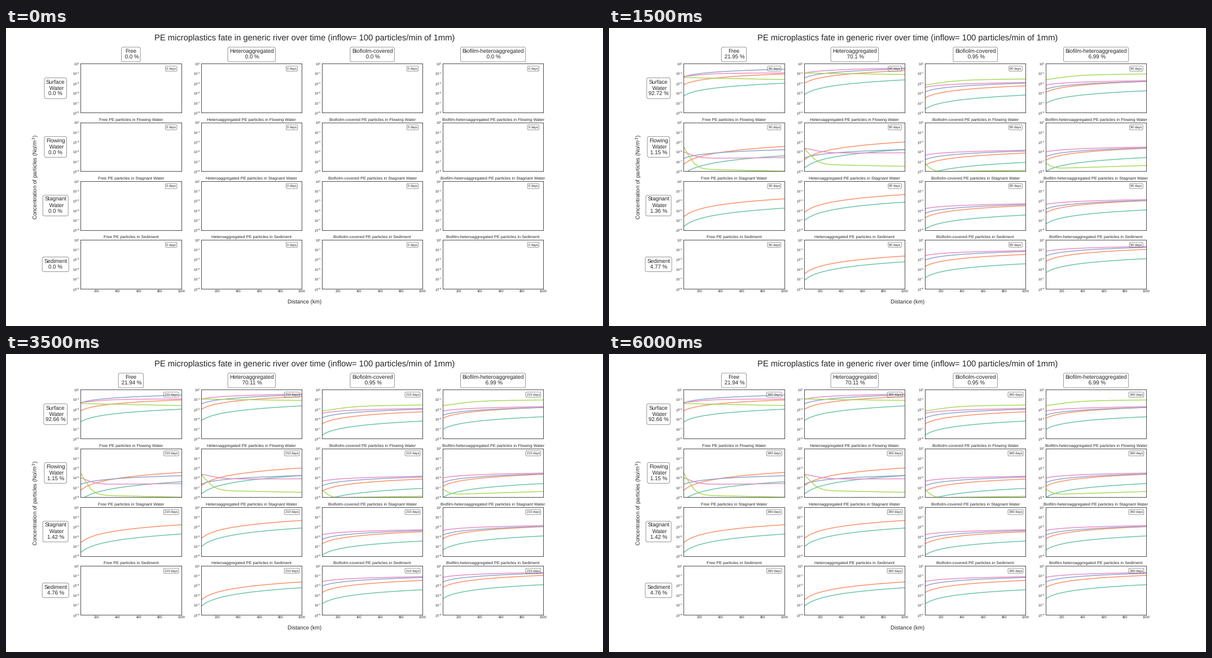
A matplotlib script for the animation above (6500 ms loop, 1058 by 529 pixels).

```python
import numpy as np
import matplotlib.pyplot as plt
from matplotlib.animation import FuncAnimation

INK = "0.15"
plt.rcParams.update({
    "font.family": "sans-serif",
    "font.sans-serif": ["Liberation Sans"],
    "mathtext.fontset": "dejavusans",
    "text.hinting": "none",
    "text.color": INK,
    "axes.edgecolor": INK,
    "axes.linewidth": 1.0,
    "xtick.color": INK,
})

TEAL, ORANGE, BLUE, PINK, GREEN = "#66c2a5", "#fc8d62", "#8da0cb", "#e78ac3", "#a6d854"
FORMS = ("Free", "Heteroaggregated", "Biofiolm-covered", "Biofilm-heteroaggregated")
PLACES = ("Surface Water", "Flowing Water", "Stagnant Water", "Sediment")

STEP_DAYS = 30
FRAMES = 13
SETTLE_DAYS = 28.2

# Share in percent: settled value and the part that decays away
FORM_SHARES = ((21.937, 0.21), (70.112, -0.29), (0.95, 0.02), (6.99, 0.11))
PLACE_SHARES = ((92.6635, 1.354), (1.153, 0.02), (1.42, -1.42), (4.7635, 0.05))

# log10 concentration at the river's end, places down and forms across
NONE = np.nan
TEAL_ENDS = np.array([[-2.98, -2.29, -5.40, -4.52],
                      [-5.80, -4.55, -7.16, -6.18],
                      [-4.50, -3.27, -5.93, -4.89],
                      [NONE, -3.47, -3.89, -2.85]])
BLUE_ENDS = np.array([[-0.10, -0.04, -2.98, -2.62],
                      [-4.57, -4.53, -4.85, -4.20],
                      [NONE, NONE, -3.80, -2.94],
                      [NONE, NONE, -1.38, -0.53]])
ORANGE_GAP = np.full((4, 4), 1.9)
ORANGE_GAP[1:, 1] = 1.56, 1.55, 1.18
PINK_GAP = 0.17
SURFACE_SPREAD = (0.9, 1.05, 1.0, 0.9)

# Curves that bend early: start, level after the bend, end, bend length in km
BENDS = {
    (0, 0): {PINK: (-1.59, -1.00, -0.87, 200), GREEN: (-1.82, -1.82, -2.23, 80)},
    (0, 1): {GREEN: (-0.90, -0.90, -1.19, 80)},
    (0, 2): {GREEN: (-3.32, -2.40, -2.11, 220)},
    (0, 3): {GREEN: (-2.23, -1.35, -1.08, 220)},
    (1, 0): {PINK: (-5.00, -6.38, -6.18, 105), GREEN: (-4.00, -8.50, -8.96, 80)},
    (1, 1): {PINK: (-4.28, -5.30, -5.20, 150), GREEN: (-4.34, -7.55, -7.97, 90)},
    (1, 2): {GREEN: (-7.40, -9.10, -8.77, 55)},
    (1, 3): {GREEN: (-7.30, -8.45, -7.80, 55)},
}

cell = np.arange(1, 21)
distance = 50 * cell
reach = np.log((cell + 0.5) / 1.5) / np.log(20.5 / 1.5)


def grow(end, rise):
    return end - rise * (1 - reach)


def bend(start, level, end, length):
    travelled = distance - distance[0]
    decay = np.exp(-(travelled / length) ** 1.4)
    return level + (start - level) * decay + (end - level) * travelled / travelled[-1]


def fills_slowly(panel):
    row, col = panel
    return row > 1 and col < 2


def panel_levels(panel):
    row, col = panel
    spread = SURFACE_SPREAD[col] if row == 0 else 1
    fine_rises = (3.75, 3.63) if row and col < 2 else (2.85 * spread, 2.45 * spread)
    teal, blue = TEAL_ENDS[panel], BLUE_ENDS[panel]
    levels = {
        TEAL: grow(teal, fine_rises[0]),
        ORANGE: grow(teal + ORANGE_GAP[panel], fine_rises[1]),
        BLUE: grow(blue, 1.75 * spread),
        PINK: grow(blue + PINK_GAP, 1.0 * spread),
    }
    levels.update({color: bend(*shape) for color, shape in BENDS.get(panel, {}).items()})
    return levels


def boxed(ax, x, y, size):
    box = dict(boxstyle="round", facecolor="white", edgecolor="black", alpha=0.5)
    return ax.text(x, y, "", transform=ax.transAxes, fontsize=size,
                   ha="center", va="center", bbox=box)


def style_axes(ax, row, col):
    ax.set(xlim=(50, 1000), ylim=(-9, 1), yticks=[])
    ax.set_xticks(range(200, 1001, 200))
    ax.tick_params(length=0, pad=2.5, labelsize=7, labelbottom=row == 3)
    for power in range(-9, 2, 2):
        ax.annotate(rf"$\mathdefault{{10^{{{power}}}}}$", (0, power),
                    xycoords=("axes fraction", "data"), xytext=(-1.7, -4.4),
                    textcoords="offset points", fontsize=7,
                    ha="right", va="baseline")
    if row:
        ax.set_title(f"{FORMS[col]} PE particles in {PLACES[row]}", fontsize=9, pad=4)


def share(parts, day):
    settled, amplitude = parts
    value = settled + amplitude * np.exp(-day / SETTLE_DAYS) if day else 0.0
    return f"{round(float(value), 2)} %"


fig, axes = plt.subplots(4, 4, figsize=(18, 9), dpi=1058 / 18)
fig.subplots_adjust(left=0.125, right=0.9, bottom=0.125, top=0.88,
                    wspace=0.2, hspace=0.2)
fig.suptitle("PE microplastics fate in generic river over time "
             "(inflow= 100 particles/min of 1mm)", fontsize=18)
fig.text(0.5, 0.075, "Distance (km)", fontsize=12, ha="center")
fig.text(0.05, 0.5, "Concentration of particles (No/$m^3$)", fontsize=12,
         rotation=90, ha="center", va="center")

curves, day_labels = [], []
for panel, ax in np.ndenumerate(axes):
    style_axes(ax, *panel)
    for color, levels in panel_levels(panel).items():
        line, = ax.plot([], [], color=color, lw=1.75)
        curves.append((line, levels, fills_slowly(panel)))
    day_labels.append(boxed(ax, 0.9, 0.9, 7))
form_labels = [boxed(ax, 0.5, 1.19, 12) for ax in axes[0]]
place_labels = [boxed(ax, -0.25, 0.5, 12) for ax in axes[:, 0]]


def update(frame):
    day = frame * STEP_DAYS
    for line, levels, slow in curves:
        if day:
            filled = 1 - np.exp(-day / SETTLE_DAYS) if slow else 1
            line.set_data(distance, levels + np.log10(filled))
        else:
            line.set_data([], [])
    for label in day_labels:
        label.set_text(f"{day} days")
    for label, name, parts in zip(form_labels, FORMS, FORM_SHARES):
        label.set_text(f"{name}\n {share(parts, day)}")
    for label, name, parts in zip(place_labels, PLACES, PLACE_SHARES):
        heading = name.replace(" ", "\n ")
        label.set_text(f"{heading}\n{share(parts, day)}")
    return []


anim = FuncAnimation(fig, update, frames=FRAMES, interval=500, repeat=True,
                     repeat_delay=0, init_func=lambda: update(0))
plt.show()
```
